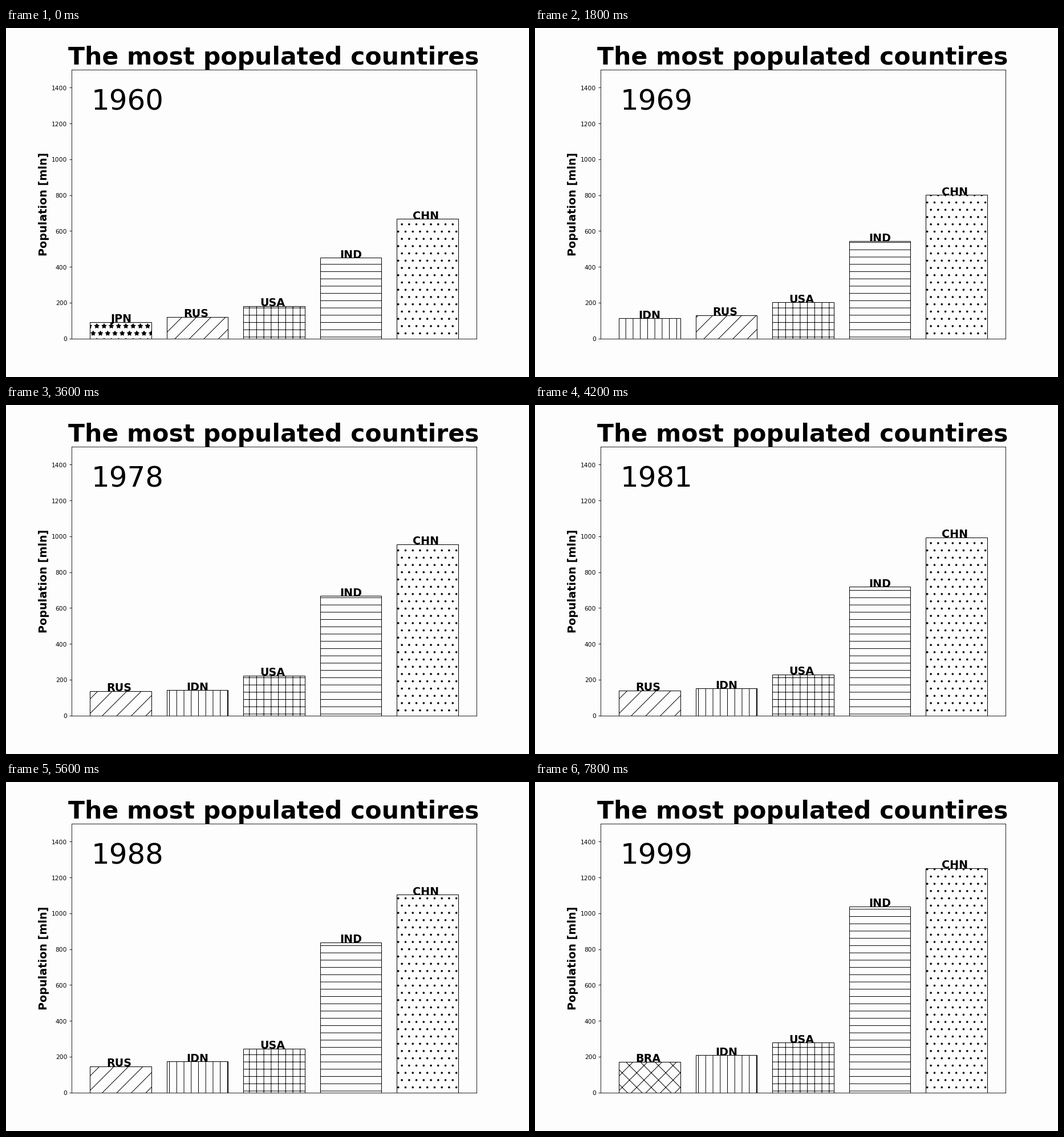
A matplotlib script that plays this animation: 917x611 px, repeating every 8 s.

```python
import numpy as np
import matplotlib.pyplot as plt
from matplotlib.animation import FuncAnimation
from matplotlib.patches import PathPatch
from matplotlib.path import Path
from matplotlib.transforms import Affine2D

W, H = 917, 611
START, YEARS, TOP = 1960, 40, 5
PAPER = "#fdfdfd"
LINE = 0.94  # one pixel wide at this dpi

# Population in millions: a few turning points, straight growth in between
GROWTH = {
    "CHN": {1960: 667, 1963: 682, 1971: 841, 1975: 916, 1981: 994,
            1990: 1135, 1999: 1253},
    "IND": {1960: 450.5, 1969: 543, 1978: 667.5, 1988: 837.5, 1999: 1038},
    "USA": {1960: 180.7, 1970: 205, 1990: 249.6, 1999: 279},
    "RUS": {1960: 119.9, 1965: 126.5, 1990: 148},
    "IDN": {1960: 87.8, 1965: 100.2, 1980: 147.5, 1999: 208.6},
    "JPN": {1960: 93, 1965: 99},
    "BRA": {1960: 72, 1990: 149, 1999: 172.3},
}

# Patterns live on a grid of 72 by 48 cells hung from the top left corner.
COLS, ROWS = 72, 48


def strokes(x, y, run):
    """Parallel lines that begin at (x, y) and all extend by run."""
    starts = np.column_stack(np.broadcast_arrays(x, y))
    ends = starts + run
    points = np.stack([starts, ends], axis=1).reshape(-1, 2)
    return Path(points, [Path.MOVETO, Path.LINETO] * len(starts))


def marks(shape, size):
    """Staggered rows of one small shape."""
    return Path.make_compound_path(*(
        Path(shape.vertices * size + (col + row % 2 / 2, -row), shape.codes)
        for row in range(ROWS) for col in range(COLS)))


k = np.arange(COLS)
upright = strokes(k + 0.5, 0, (0, -ROWS))
level = strokes(0, -k - 0.5, (COLS, 0))
rising = strokes(2 * k, 0, (-ROWS, -ROWS))
falling = strokes(2 * k - ROWS, 0, (ROWS, -ROWS))

PATTERNS = {
    "CHN": marks(Path.unit_circle(), 0.1),
    "IND": level,
    "USA": Path.make_compound_path(upright, level),
    "RUS": rising,
    "IDN": upright,
    "JPN": marks(Path.unit_regular_star(5), 1 / 3),
    "BRA": Path.make_compound_path(rising, falling),
}


def population(name, year):
    points = GROWTH[name]
    return float(np.interp(year, list(points), list(points.values())))


fig, ax = plt.subplots(figsize=(12, 8), dpi=76.42, facecolor=PAPER)
ax.set_facecolor(PAPER)
ax.set_title("The most populated countires", x=0.499, fontsize=40.1,
             fontweight="bold")
ax.set_ylabel("Population [mln]", fontsize=18, fontweight="bold", labelpad=3.2)

bars = ax.bar(range(TOP), [0] * TOP, 0.8, fill=False,
              edgecolor="black", linewidth=LINE, zorder=3)
ax.set_xlim(-0.64, 4.64)
ax.set_ylim(0, 1500)
ax.set_xticks([])

to_stage = Affine2D().scale(W / COLS, H / ROWS).translate(0, H)
sheets = {
    name: ax.add_artist(PathPatch(path, color="black", linewidth=LINE,
                                  transform=to_stage, snap=False, zorder=2))
    for name, path in PATTERNS.items()}

labels = [ax.text(0, 0, "", fontsize=18, fontweight="bold", ha="right",
                  zorder=4) for _ in range(TOP)]
year_text = ax.text(-0.383, 1276, "", fontsize=47, zorder=4)


def update(i):
    year = START + i
    size = {name: population(name, year) for name in GROWTH}
    ranking = sorted(size, key=size.get)[-TOP:]
    year_text.set_text(str(year))
    for name, sheet in sheets.items():
        sheet.set_visible(name in ranking)
    for place, name in enumerate(ranking):
        bars[place].set_height(size[name])
        sheets[name].set_clip_path(bars[place])
        labels[place].set_text(name)
        labels[place].set_position((place + 0.145, size[name]))
    return [*sheets.values(), *bars, *labels, year_text]


anim = FuncAnimation(fig, update, frames=YEARS, interval=200,
                     init_func=lambda: update(0), repeat=True)
plt.show()
```
